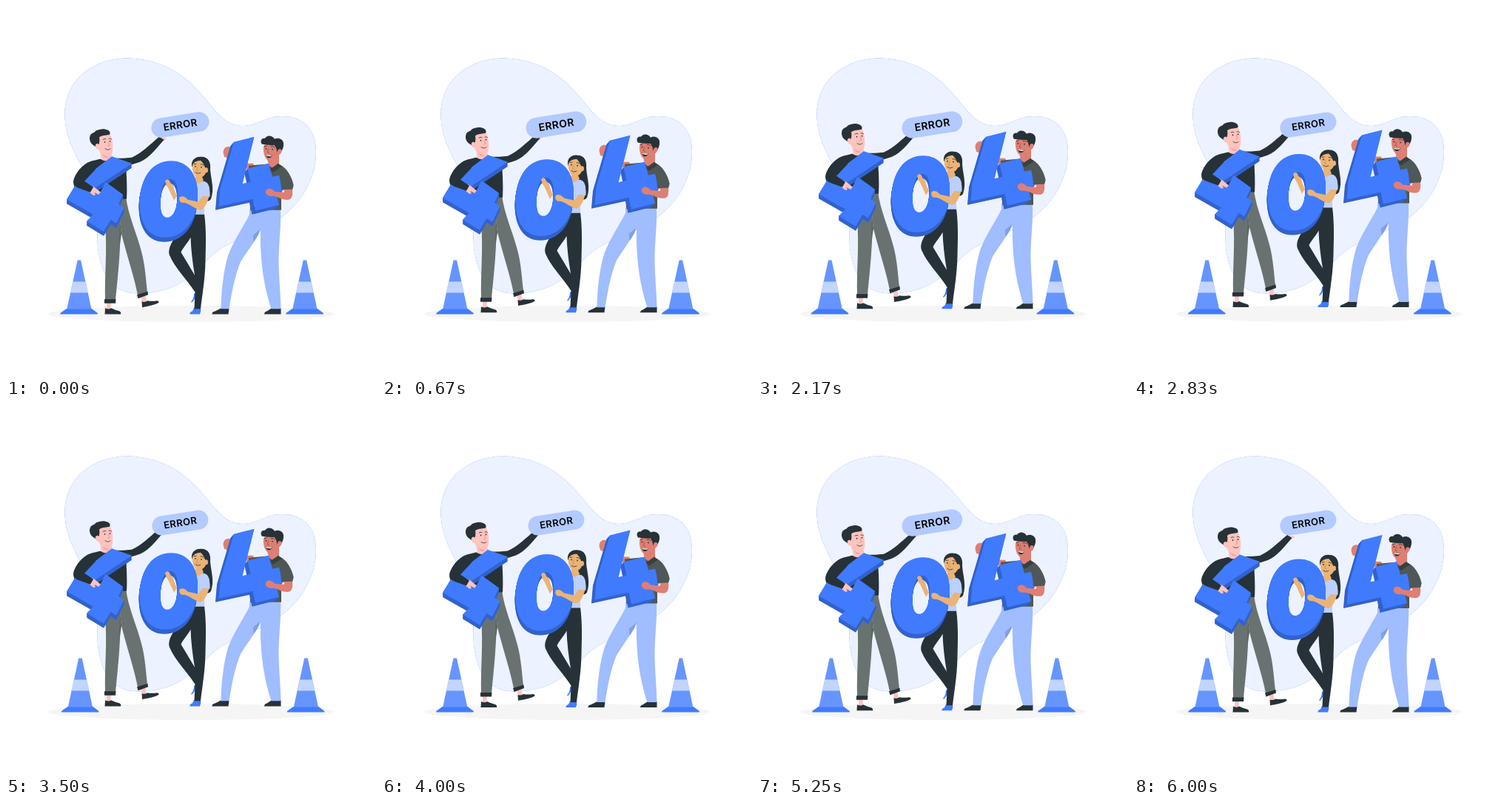
Recreate the animation shown at these times as an HTML page. Size 500x500 px, loop 6040 ms.

```html
<!DOCTYPE html>
<html lang="en">
<head>
<meta charset="utf-8">
<title>Error 404</title>
<style>
  html, body { margin: 0; width: 100%; height: 100%; overflow: hidden; background: #fff; }
  svg { display: block; width: 100%; height: 100%; }
  .dark { fill: #263238; }
  .blue { fill: #407bff; }
  .pale { fill: #ffc3bd; }
  .tan { fill: #ebb376; }
  .brown { fill: #de7f73; }
  .grey { fill: #687371; }
  .polo { fill: #4f5856; }
  .sky { fill: #9fbdff; }
  .shirt { fill: #bcd0ff; }
  .side { fill: #3362cc; }
  .line { fill: none; stroke: #263238; stroke-width: .8; stroke-linecap: round; }
  text { font: 600 13px Inter, "Open Sans", sans-serif; letter-spacing: .4px; }
</style>
</head>
<body>
<svg viewBox="0 0 500 500">
  <defs>
    <path id="blob" d="M79.5 150C78 100 118 70 166 70.5C210 72 240 92 262 117C283 141 295 162 320 162C343 161 350 149 373 149C403 149 419 168 419 197C419 235 398 268 365 291C330 313 300 316 275 340C250 366 230 388 178 388.5C143 388 128 362 124 325C122 285 128 270 118 245C108 222 81 190 79.5 150Z"/>
    <g id="cone">
      <path class="blue" d="M82 409H116L124 415V416.5H73.5V415Z"/>
      <path fill="#6695ff" d="M96.8 343.5H101.3L115.6 409.5H82.4Z"/>
      <path fill="#c2d5ff" d="M90.5 372.5H107.6L111 387.5H87.1Z"/>
    </g>
  </defs>

  <use href="#blob" fill="#407bff"/>
  <use href="#blob" fill="#fff" opacity=".9"/>
  <ellipse cx="250" cy="416" rx="193" ry="11" fill="#f5f5f5"/>
  <g id="cones"><use href="#cone"/><use href="#cone" x="305"/></g>

  <g id="people">
    <!-- man on the left -->
    <path class="pale" d="M136 401H142L141 412H136ZM182 390L188 389L190 401L184 402Z"/>
    <path class="dark" d="M134 408.5Q139 411 142 408.5Q147 411 153 412.5Q156 414 155 416.6H133.5ZM183.5 399.5Q188 401 191 398.5Q197 399.5 204 398.5Q207 399 206.5 401Q200 405 184 407.3Z"/>
    <path class="grey" d="M136 258H162C165 283 177 308 183 332C188 350 189 370 191 387L178 391C173 365 164 340 156 308L154 290C156 325 151 365 148 398H134C133 365 137 330 134 298Z"/>
    <path fill="#566160" d="M154 290L156 308L153 328Z"/>
    <path class="dark" d="M133 396.5H148.5L148 402H133ZM177 390.5L191.5 386L192 390.5L178.5 395.5Z"/>
    <path class="pale" d="M206 179C208 176 213 178 217 179C218 181 213 181 210 184Z"/>
    <path class="dark" d="M127 207Q138 210 147 206C155 206 162 206 170 205C183 199 194 188 207 177L213.5 181C203 193 193 206 181 211Q170 215 162 215.500C163 230 164 248 163 261H134L120 248L108 240L94 247Q90 242 92 234C97 222 106 211 119 209Z"/>
    <path class="pale" d="M126 190L129 208Q138 212 145 206L142 200Z"/>
    <path class="pale" d="M123 183C125 175 132 172 140 172C144 179 145 189 144 196C143 203 138 205 133 202C127 200 123 193 123 183Z"/>
    <path fill="#f1a49f" d="M130 200Q134 204 139 204Q137 207 132 204Z"/>
    <path class="dark" d="M119 189C114 186 112 181 113.5 176C115 171 120 172 121 169C127 166 133 165.5 138 168C141 170 141 172 140 174C135 175 128 175 126 178C127 182 126 185 125.500 188L122 191Z"/>
    <ellipse class="pale" cx="124" cy="190" rx="3" ry="4" transform="rotate(-18 124 190)"/>
    <circle class="dark" cx="133.5" cy="184" r=".9"/><circle class="dark" cx="140.5" cy="183" r=".9"/>
    <path class="line" d="M131 180.5Q133 179 135 180M139 179.5Q141 178.5 142.5 180M134 193Q138 196 141 193"/>
    <path class="line" style="stroke:#ed847e" d="M138 184L140 188.5L137.5 189.5"/>

    <path class="solid blue" data-y="6" d="M143 203.500L170 213L116 249L126 255L134.500 238L158 255L152 268L159.500 273L149 294L141.500 289L132 305L109 291L118 282L82 261.5L95 240Z"/>
    <path class="pale" d="M111 245C116 241 119 245 122 247L128 252L125 255L119 252C123 257 119 258 113 252Z"/>
    <path class="dark" d="M119 209C106 212 97 222 92.5 232C89 240 93 245 100 247L114 252L118 245L106 237L121 221Z"/>

    <!-- woman -->
    <path class="blue" d="M250 400Q254 396 254 389L257 388Q256 397 251 401Z"/>
    <path class="blue" d="M254 408H263Q264 412 262 416.6H248.5Q248 414 252 412.5Z"/>
    <path class="dark" d="M240 281H268C271 305 270 325 269.5 345C269 370 265 392 263 409.5H254.5L255.5 387C243 368 228 354 221 337C217 325 231 311 236 300ZM249.5 313C245 321 239 327 236.5 333L255 364C252 346 250 329 249.5 313Z" fill-rule="evenodd"/>
    <path class="dark" d="M251 216C250 208 257 203 264 204C274 204 277 212 276 221C277 235 282 247 277 261C274 266 266 264 262 258L256 226Z"/>
    <path class="shirt" d="M248 240Q256 236 265 237C274 237 276 244 275 257L268 264L268 282H246Z"/>
    <path class="tan" d="M262 224L267 236Q260 243 253 238L257 229Z"/>
    <path class="tan" d="M252 215C253 208 262 205 268 211C274 218 271 230 263 232C255 232 251 226 252 215Z"/>
    <path class="dark" d="M251.500 215C252 206 262 202 269 206C277 211 274 222 272 228C270 221 268 213 263 209C258 209 254 211 251.500 215Z"/>
    <ellipse class="tan" cx="270.5" cy="222" rx="2.5" ry="3.5"/>
    <circle class="dark" cx="256" cy="217" r=".9"/><circle class="dark" cx="264" cy="218" r=".9"/>
    <path class="line" d="M254 214L257 213.5M263 214Q265 213.5 267 215.5M256 225Q259 228 263 225.5"/>
    <path class="line" style="stroke:#c78d51" d="M259.5 217L257.5 222L260 222.5"/>

    <path class="solid blue" fill-rule="evenodd" data-x="-1" data-y="6" d="M223 209.500C246 209.500 260 228 259 257C259 290 240 313 215 313C193 313 180.500 295 180.500 265C182 231 198 209.500 223 209.500ZM222 234C229 234 233 243 232 259C231 276 225 286 218 286C211 286 208 278 209 262C210 244 215 234 222 234Z"/>
    <path class="tan" d="M215 237C217 233 221 234 222 239L226 243C227 249 229 253 231 257L227 263C223 255 221 248 217 243Z"/>
    <path class="tan" d="M267 255L275 256C272 266 268 276 262 276C255 274 247 267 241 266C237 267 233 264 234.5 259C239 255 244 260 246 262L260 265Z"/>
    <path class="shirt" d="M263 239C271 234 276 243 275.5 258L265 257Z"/>

    <!-- man on the right -->
    <path class="dark" d="M291 408.5H301.5L300.5 416.6H278.5Q278 413.5 283 412.5ZM359 408.5H371.5V416.6H349Q349 413.5 353 412.5Z"/>
    <path class="sky" d="M329 275H371C372 300 368 325 368.5 350C369 370 371 390 371.5 409.5H358.5C350 383 343 350 344 303C340 313 327 330 317 346C309 365 305 388 301.5 409.5H290.5C291 382 295 352 301 335C309 315 320 300 329 282Z"/>
    <path fill="#7f9fe6" d="M343.500 302L334 310L334.500 319.500Q341 311 343.500 302Z"/>
    <path class="brown" d="M322 213L334 213L338 222L323 220Z"/>
    <path class="polo" d="M328 216L350 214L367 214C378 216 386 230 388.5 242L387 248L372 249V276H330Z"/>
    <path class="brown" d="M352 203L369 199L369 215Q362 223 355 215Z"/>
    <path fill="#37413f" d="M354 214L358 220L368 213L373 217L361 225L352 219Z"/>
    <path class="brown" d="M348 190C350 184 364 184 370 190C372 199 368 207 360 210C352 211 347 203 348 190Z"/>
    <path class="dark" d="M346 187C343 183 345 178 350 179C352 175 359 174 363 180C369 177 376 181 375 188C375 193 372 197 369 201L366 197C366 192 364 191 363 188C357 189 350 187 346 187Z"/>
    <ellipse class="brown" cx="369.5" cy="197" rx="2.8" ry="3.7" transform="rotate(18 369.5 197)"/>
    <circle class="dark" cx="351.5" cy="193" r=".9"/><circle class="dark" cx="360" cy="194" r=".9"/>
    <path class="line" d="M349.5 190L352 189.5M358 190Q361 189 363 191"/>
    <path class="line" style="stroke:#9e4b43" d="M355 193L353 198L355.5 198.5"/>
    <path class="dark" d="M351 200Q355 203 360 201Q358 207 353 205Z"/>
    <path fill="#fff" d="M351.5 200.5Q355 203 359.5 201.3L358.5 203Q355 204 352 202.2Z"/>
    <path class="brown" d="M293.5 198C294 191 299 188 306 192L302 207L295 204Z"/>

    <path class="solid blue" data-x="-4.5" data-y="5" d="M308 184L335.5 177L319.500 240.500L330.500 238L326.500 220L355 213L360 231L369 229L374 250L365 252L369 269L337 277L333.500 261L287.500 271L289.5 247Z"/>
    <path class="brown" d="M376 247H387C388 258 386 263 378 262C371 262 367 257 360 257C355 258 351 255 350.5 251C353 244 360 247 363 251L376 252Z"/>
    <path class="polo" d="M370 219C380 221 387 233 388.5 243L387 248L372 248.5Z"/>
  </g>

  <g id="sign">
    <rect x="-38.3" y="-13" width="76.6" height="26" rx="13" fill="#b3caff"/>
    <text x=".2" y="4.6" text-anchor="middle">ERROR</text>
  </g>
</svg>
<script>
const $ = id => document.getElementById(id);

// Give each numeral its depth with darker copies behind it.
for (const face of document.querySelectorAll('.solid')) {
  const { x = 0, y = 0 } = face.dataset, steps = 10;
  for (let i = steps; i > 0; i--) {
    const copy = face.cloneNode();
    copy.setAttribute('class', 'side');
    copy.setAttribute('transform', `translate(${x * i / steps} ${y * i / steps})`);
    face.before(copy);
  }
}

// Linear keyframes: pairs of [position, value].
function track(p, keys) {
  const i = Math.max(1, keys.findIndex(k => k[0] >= p));
  const [p0, v0] = keys[i - 1], [p1, v1] = keys[i];
  return v0 + (v1 - v0) * (p - p0) / (p1 - p0);
}

const bob = [[0, 0], [.5, -10], [1, 0]];
const shake = [0, -1, 2, -4, 4, -4, 4, -4, 2, -1, 0].map((v, i) => [i / 10, v]);
const beat = [[0, 1], [.1, 1.1], [.3, 1], [.4, 1], [.5, 1.1], [.6, 1], [1, 1]];

function draw() {
  const t = Math.min(performance.now() % 6040 + 40, 6000);
  const phase = period => t % period / period;
  $('people').setAttribute('transform', `translate(0 ${track(phase(6000), bob)})`);
  $('cones').setAttribute('transform', `translate(${track(phase(3000), shake)} 0)`);
  $('sign').setAttribute('transform',
    `translate(235.4 160.5) rotate(-9) scale(${track(phase(1500), beat)})`);
  requestAnimationFrame(draw);
}
draw();
</script>
</body>
</html>
```
